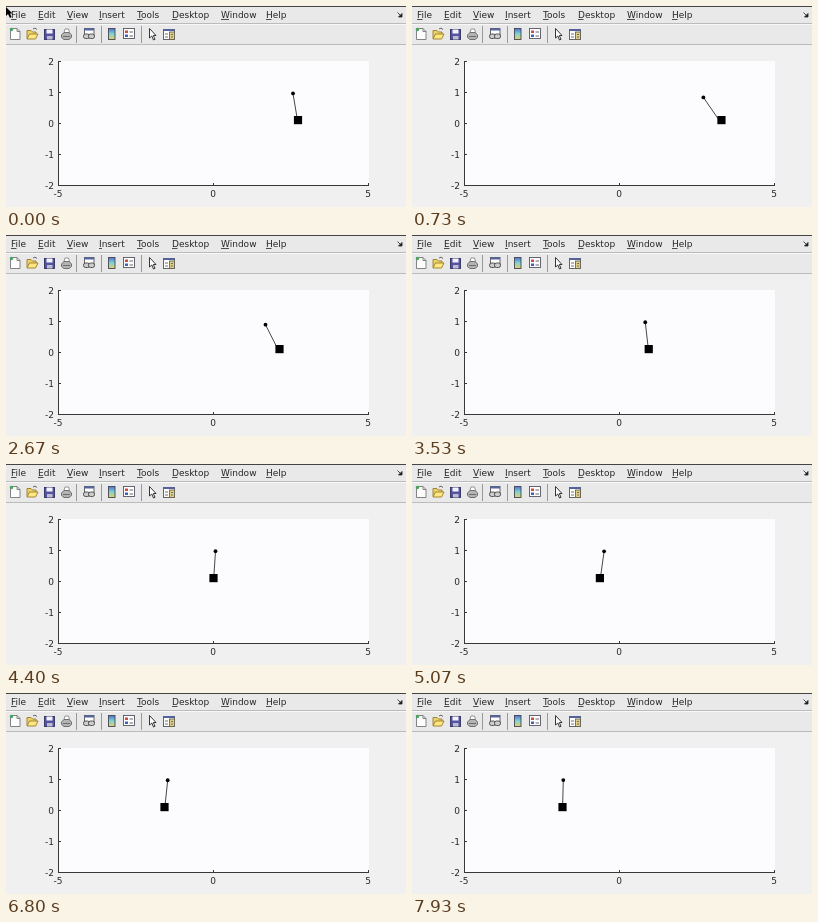
Recreate the animation shown at these times as an HTML page. Size 400 by 201 pixels, loop 8000 ms.

```html
<!DOCTYPE html>
<html lang="en">
<head>
<meta charset="utf-8">
<title>Cart and pendulum</title>
<style>
html, body { margin: 0; width: 100%; height: 100%; overflow: hidden; background: #f0f0f0; }
svg { display: block; width: 100%; height: 100%; }
text { font: 9px "DejaVu Sans", sans-serif; fill: #262626; }
.sharp { shape-rendering: crispEdges; }
</style>
</head>
<body>
<svg viewBox="0 0 400 201">
  <rect width="400" height="201" fill="#f0f0f0"/>
  <g class="sharp">
    <rect width="400" height="39" fill="#e9e9e9"/>
    <path d="M0 .5H400" stroke="#444"/>
    <path d="M0 17.5H400M0 38.5H400" stroke="#bbb"/>
    <path d="M0 18.5H400" stroke="#f8f8f8"/>
    <path d="M70.5 20V37M95.5 20V37M135.5 20V37" stroke="#999"/>
  </g>
  <g id="menu"></g>
  <path d="M391.5 6.5L395 10M396 7.5V11H392.5Z" stroke="#222" fill="#222" stroke-width=".8"/>

  <g id="tools" stroke-width=".9">
    <path d="M4.5 22.5H11L14 25.5V33.5H4.5Z" fill="#fdfdfd" stroke="#777"/>
    <path d="M11 22.5V25.5H14" fill="none" stroke="#777"/>
    <circle cx="5.5" cy="23.5" r="1.7" fill="#46a65b"/>
    <path d="M21 32.5V24.5H25L26.5 26H30V28" fill="#ead36b" stroke="#9b7b25"/>
    <path d="M21 33L23.5 28H32L29.5 33Z" fill="#ffe884" stroke="#9b7b25"/>
    <path d="M27 23Q29 21 31 23.5" fill="none" stroke="#555"/>
    <rect x="38.5" y="23.5" width="10" height="10" fill="#5552a0" stroke="#303060"/>
    <rect x="40.5" y="23.5" width="6" height="4" fill="#f3f3ff"/>
    <rect x="41" y="30" width="5.5" height="3.5" fill="#bbbcd0"/>
    <path d="M57.5 28L59 23H62.5L64 28" fill="#fff" stroke="#888"/>
    <path d="M55.5 29L58 26.5H63L65.5 29V31.5L63 33.5H58L55.5 31.5Z" fill="#b4b4b4" stroke="#666"/>
    <path d="M57 30.5H64" stroke="#666"/>
    <rect x="78.5" y="22.5" width="9.5" height="8" fill="#fff" stroke="#555"/>
    <path d="M78.5 23.5H88" stroke="#5265a5" stroke-width="2"/>
    <rect x="77.5" y="28" width="6" height="4.5" rx="2" fill="#ccc" stroke="#444"/>
    <rect x="82.500" y="28" width="6" height="4.5" rx="2" fill="#ccc" stroke="#444"/>
    <rect x="102.5" y="22.5" width="6.5" height="11" fill="url(#bar)" stroke="#445"/>
    <rect x="117.500" y="22.500" width="11" height="10" fill="#fff" stroke="#556"/>
    <rect x="119" y="24.500" width="3" height="2.5" fill="#d34a40"/>
    <rect x="119" y="28.500" width="3" height="2.5" fill="#4361b8"/>
    <path d="M123.5 26H127M123.5 30H127" stroke="#555"/>
    <path d="M143.5 22.5V32L145.8 30L147.5 34L149 33.3L147.3 29.5H150Z" fill="#fff" stroke="#222"/>
    <rect x="157.5" y="23.5" width="11" height="10" fill="#fff" stroke="#555"/>
    <path d="M157.5 24H168.5" stroke="#55629b" stroke-width="2"/>
    <rect x="163.5" y="26" width="5" height="7.5" fill="#dfcd87" stroke="#665"/>
    <path d="M159 28H162M159 31H162M165 28.5H167M165 31H167" stroke="#665"/>
  </g>
  <defs>
    <linearGradient id="bar" x1="0" y1="0" x2="0" y2="1">
      <stop stop-color="#4f70d0"/><stop offset=".5" stop-color="#7fd6cf"/><stop offset="1" stop-color="#e9cf62"/>
    </linearGradient>
  </defs>

  <rect x="52" y="55" width="311" height="125" fill="#fcfcff"/>
  <path id="axes" class="sharp" fill="none" stroke="#383838"/>
  <g id="labels"></g>

  <path id="pole" stroke="#333" stroke-width=".9"/>
  <circle id="bob" r="1.9"/>
  <rect id="cart" y="110" width="8.2" height="8.2"/>
  <path id="pointer" d="M0 1V10L2 8L4 12L5.5 11L4 7.5H6.5Z"/>
</svg>
<script>
const $ = id => document.getElementById(id);

function add(parent, tag, attrs, text = "") {
  const node = document.createElementNS("http://www.w3.org/2000/svg", tag);
  for (const key in attrs) node.setAttribute(key, attrs[key]);
  node.textContent = text;
  parent.append(node);
}

const menu = { File: 5, Edit: 32, View: 61, Insert: 93, Tools: 131, Desktop: 166, Window: 215, Help: 260 };
for (const [name, x] of Object.entries(menu)) {
  add($("menu"), "text", { x, y: 12 }, name);
  const width = name[0] === "I" ? 3 : name[0] === "W" ? 8 : 5.5;
  add($("menu"), "path", { d: `M${x} 13.5h${width}`, stroke: "#262626", "stroke-width": 0.8 });
}

let axes = "M52.5 55V179.5H363";
for (let v = -2; v <= 2; v++) {
  const y = 117.5 - 31 * v;
  axes += `M52 ${y}h3`;
  add($("labels"), "text", { x: 48, y: y + 3.5, "text-anchor": "end" }, v);
}
for (const v of [-5, 0, 5]) {
  const x = 207.5 + 31 * v;
  axes += `M${x} 180v-3`;
  add($("labels"), "text", { x: x - 0.5, y: 191, "text-anchor": "middle" }, v);
}
$("axes").setAttribute("d", axes);

// Smooth curve through [ms, value] points
function curve(points) {
  const slope = i => {
    const a = points[Math.max(i - 1, 0)], b = points[Math.min(i + 1, points.length - 1)];
    return (b[1] - a[1]) / (b[0] - a[0]);
  };
  return t => {
    let i = 0;
    while (i < points.length - 2 && t >= points[i + 1][0]) i++;
    const [t0, a] = points[i], [t1, b] = points[i + 1];
    const span = t1 - t0, u = (t - t0) / span, w = 1 - u;
    return a * w * w * (1 + 2 * u) + b * u * u * (3 - 2 * u)
      + span * u * w * (slope(i) * w - slope(i + 1) * u);
  };
}

const cartX = curve([[0, 292], [400, 303.5], [870, 311.3], [1130, 312.3], [1530, 308.5], [1730, 304.5],
  [2100, 294], [2670, 273.5], [3470, 239], [4400, 207.5], [5200, 184.5], [5730, 173.5],
  [6800, 158.5], [7930, 150.5], [8000, 150.2]]);
const lean = curve([[0, -5], [400, -12], [930, -21], [1530, -24.5], [1730, -25.8], [2100, -22.5],
  [2670, -14], [3470, -4], [4400, 2], [5200, 4.5], [5730, 5], [6800, 3.2], [7930, 0.8], [8000, 0.7]]);

function draw(ms) {
  // The plot refreshes 15 times a second, on 10 ms boundaries.
  const rest = ms % 200;
  const t = ms - rest + (rest >= 130 ? 130 : rest >= 70 ? 70 : 0);
  const x = cartX(t), dx = lean(t), bobY = 87.1 + dx * dx / 76;
  $("cart").setAttribute("x", x - 4.1);
  $("pole").setAttribute("d", `M${x} 117.5L${x + dx} ${bobY}`);
  $("bob").setAttribute("cx", x + dx);
  $("bob").setAttribute("cy", bobY);
  $("pointer").style.display = t < 70 ? "" : "none";
}

const start = performance.now();
function tick() {
  draw((performance.now() - start) % 8000);
  requestAnimationFrame(tick);
}
tick();
</script>
</body>
</html>
```
